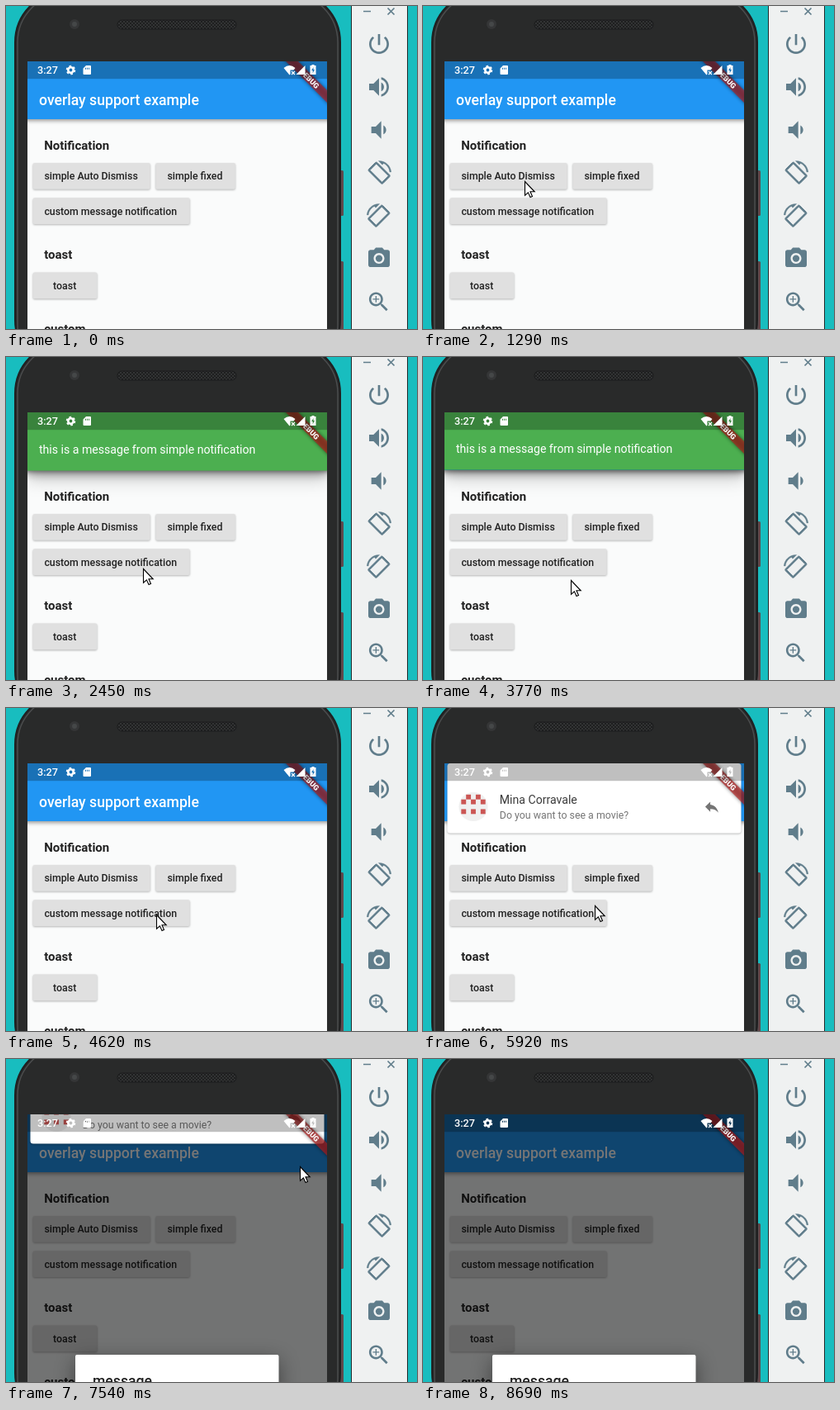
Write an HTML page that moves like this. It is 498 px wide and 391 px high and loops after 9.47 s.

```html
<!DOCTYPE html>
<html lang="en">
<head>
<meta charset="utf-8">
<title>Overlay notifications</title>
<style>
  html, body { margin: 0; width: 100%; height: 100%; overflow: hidden; background: #18bdbf; }
  svg { display: block; width: 498px; height: 391px; }
  text { font-family: Roboto, "Noto Sans", sans-serif; white-space: pre; }
  .title { font-size: 17.64px; font-weight: 500; }
  .head { font-size: 15px; font-weight: 700; fill: #212121; }
  .label { font-size: 12.35px; font-weight: 500; fill: #212121; }
  .btn { fill: #e0e0e0; filter: drop-shadow(0 1.5px 1.2px rgba(0,0,0,.28)); }
  .bar { fill: #2196f3; filter: drop-shadow(0 2px 2.5px rgba(0,0,0,.4)); }
  .high { filter: drop-shadow(0 6px 4px rgba(0,0,0,.22)) drop-shadow(0 8px 10px rgba(0,0,0,.24)); }
  .card { fill: #fff; filter: drop-shadow(0 1px 1px rgba(0,0,0,.26)); }
  .dialog { fill: #fff; filter: drop-shadow(0 7px 12px rgba(0,0,0,.45)); }
  .ink { fill: #c0c0c0; }
  .tool { fill: #607d8b; }
</style>
</head>
<body>
<svg viewBox="0 0 498 391">
  <defs>
    <clipPath id="screen"><rect x="26" y="67" width="363" height="324"/></clipPath>
    <clipPath id="autoBtn"><rect x="33" y="190.5" width="142" height="31.8" rx="2"/></clipPath>
    <clipPath id="customBtn"><rect x="33" y="232.8" width="190" height="31.8" rx="2"/></clipPath>
    <clipPath id="round"><circle cx="61" cy="119.5" r="17.6"/></clipPath>
    <pattern id="mesh" width="4" height="4" patternUnits="userSpaceOnUse">
      <rect width="4" height="4" fill="#1e1f1f"/>
      <circle cx="1" cy="1" r=".9" fill="#3c3d3e"/>
      <circle cx="3" cy="3" r=".9" fill="#3c3d3e"/>
    </pattern>
    <g id="rotate" stroke="#607d8b" stroke-width=".8">
      <path d="M10.23 1.75c-.59-.59-1.54-.59-2.12 0L1.75 8.11c-.59.59-.59 1.54 0 2.12l12.02 12.02c.59.59 1.54.59 2.12 0l6.36-6.36c.59-.59.59-1.54 0-2.12zm4.6 19.44L2.81 9.17l6.36-6.36 12.02 12.02z"/>
      <path stroke-width=".3" d="M16.48 2.52c3.27 1.55 5.61 4.72 5.97 8.48h1.5C23.44 4.84 18.29 0 12 0l-.66.03 3.81 3.81z"/>
    </g>
  </defs>

  <rect width="498" height="391" fill="#18bdbf"/>

  <!-- phone body -->
  <rect x="400" y="199" width="9" height="55" rx="1.5" fill="#5f494c"/>
  <rect x="400" y="309" width="9" height="100" rx="1.5" fill="#5f494c"/>
  <rect x="11" y="-18" width="394" height="460" rx="62" fill="#292a2a" stroke="#1f2021" stroke-width="2"/>
  <rect x="14" y="-15" width="388" height="460" rx="59" fill="#292a2a" stroke="#4b4d4e" stroke-width="1.5"/>
  <rect x="135" y="17" width="144" height="11" rx="5.5" fill="url(#mesh)" stroke="#1a1b1c"/>
  <circle cx="83" cy="22" r="6" fill="#353637"/>
  <circle cx="83" cy="22" r="3" fill="#454748"/>

  <!-- emulator toolbar -->
  <rect x="418.5" y="-2" width="68" height="396" fill="#eff1f1" stroke="#22292b"/>
  <path d="M433 6.5h9M462.5 2.5l8 8m0-8l-8 8" stroke="#607d8b" stroke-width="1.7" fill="none"/>
  <g class="tool">
    <path transform="translate(436 30) scale(1.333)" d="M13 3h-2v10h2V3zm4.83 2.17l-1.42 1.42C17.99 7.86 19 9.81 19 12c0 3.87-3.13 7-7 7s-7-3.13-7-7c0-2.19 1.01-4.14 2.58-5.42L6.17 5.17C4.23 6.82 3 9.26 3 12c0 4.97 4.03 9 9 9s9-4.03 9-9c0-2.74-1.23-5.18-3.17-6.83z"/>
    <path transform="translate(436 82) scale(1.333)" d="M3 9v6h4l5 5V4L7 9H3zm13.5 3c0-1.77-1.02-3.29-2.5-4.03v8.05c1.48-.73 2.5-2.25 2.5-4.02zM14 3.23v2.06c2.89.86 5 3.54 5 6.71s-2.11 5.85-5 6.71v2.06c4.01-.91 7-4.49 7-8.77s-2.99-7.86-7-8.77z"/>
    <path transform="translate(436 134) scale(1.333)" d="M18.5 12c0-1.77-1.02-3.29-2.5-4.03v8.05c1.48-.73 2.5-2.25 2.5-4.02zM5 9v6h4l5 5V4L9 9H5z"/>
    <use href="#rotate" transform="translate(437.5 187.5) scale(1.22)"/>
    <use href="#rotate" transform="translate(466.5 239.5) scale(-1.22 1.22)"/>
    <g transform="translate(436.4 290) scale(1.3)">
      <circle cx="12" cy="12" r="3.2"/>
      <path d="M9 2L7.17 4H4c-1.1 0-2 .9-2 2v12c0 1.1.9 2 2 2h16c1.1 0 2-.9 2-2V6c0-1.1-.9-2-2-2h-3.17L15 2H9zm3 15c-2.76 0-5-2.24-5-5s2.24-5 5-5 5 2.24 5 5-2.24 5-5 5z"/>
    </g>
    <path transform="translate(436 342.6) scale(1.3)" d="M15.5 14h-.79l-.28-.27C15.41 12.59 16 11.11 16 9.5 16 5.91 13.09 3 9.5 3S3 5.91 3 9.5 5.91 16 9.5 16c1.61 0 3.09-.59 4.23-1.57l.27.28v.79l5 4.99L20.49 19zm-6 0C7.01 14 5 11.99 5 9.5S7.01 5 9.5 5 14 7.01 14 9.5 11.99 14 9.5 14zM12.5 10H10v2.5H9V10H6.5V9H9V6.5h1V9h2.5z"/>
  </g>

  <g clip-path="url(#screen)">
    <!-- page -->
    <rect x="26" y="67" width="363" height="324" fill="#fafbfb"/>
    <rect class="bar" x="20" y="60" width="375" height="77"/>
    <text class="title" x="40" y="119.7" fill="#fff">overlay support example</text>
    <g transform="translate(-.3 -.5)">
      <text class="head" x="46.5" y="174.5">Notification</text>
      <rect class="btn" x="33" y="190.5" width="142" height="31.8" rx="2"/>
      <rect class="btn" x="181.7" y="190.5" width="96.5" height="31.8" rx="2"/>
      <rect class="btn" x="33" y="232.8" width="190" height="31.8" rx="2"/>
      <rect class="btn" x="33" y="323" width="77.7" height="31.8" rx="2"/>
      <g clip-path="url(#autoBtn)"><circle class="ink" id="inkAuto" cx="112" cy="202"/></g>
      <g clip-path="url(#customBtn)"><circle class="ink" id="inkCustom" cx="182" cy="250"/></g>
      <text class="label" x="46.7" y="210.7">simple Auto Dismiss</text>
      <text class="label" x="195.8" y="210.7">simple fixed</text>
      <text class="label" x="46.7" y="253">custom message notification</text>
      <text class="head" x="46.5" y="306.5">toast</text>
      <text class="label" x="71.5" y="343.2" text-anchor="middle">toast</text>
      <text class="head" x="46.5" y="396">custom</text>
    </g>

    <!-- dialog -->
    <g id="modal">
      <rect x="26" y="67" width="363" height="324" fill="#000" opacity=".54"/>
      <rect class="dialog" x="84" y="358" width="246.5" height="90" rx="2"/>
      <text class="title" x="105" y="396.2" fill="#212121">message</text>
    </g>

    <!-- notifications -->
    <g id="simple">
      <rect class="high" x="26" y="40" width="363" height="97.6" fill="#4caf50"/>
      <text x="40" y="117.2" font-size="14.1" fill="#fff">this is a message from simple notification</text>
    </g>
    <g id="message">
      <rect class="card" x="29.5" y="67" width="356" height="84.5" rx="3.5"/>
      <circle cx="61" cy="119.5" r="17.6" fill="#f0f0f0"/>
      <g id="avatar" fill="#cb5654" clip-path="url(#round)"></g>
      <text x="92.8" y="116" font-size="14.1" fill="#3c3c3c">Mina Corravale</text>
      <text x="92.8" y="133.5" font-size="12.35" fill="#757575">Do you want to see a movie?</text>
      <circle id="inkReply" cy="119.5" fill="#b0b0b0"/>
      <path transform="translate(339.3 109) scale(.882)" fill="#757575" d="M10 9V5l-7 7 7 7v-4.1c5 0 8.5 1.6 11 5.1-1-5-4-10-11-11z"/>
    </g>

    <!-- debug ribbon -->
    <g transform="translate(389 67) rotate(45)">
      <rect x="-40" y="24.7" width="80" height="10.6" opacity=".5" style="filter:blur(2.2px)"/>
      <rect x="-36" y="24.7" width="72" height="10.6" fill="#b71c1c" opacity=".63"/>
      <text y="33.2" text-anchor="middle" font-size="9" font-weight="900" fill="#fff">DEBUG</text>
    </g>

    <!-- status bar -->
    <rect x="26" y="67" width="363" height="21.2" fill="#000" opacity=".25"/>
    <g fill="#fff">
      <text x="38" y="82.2" font-size="12.7" font-weight="500">3:27</text>
      <circle cx="78.5" cy="77.5" r="3.2" fill="none" stroke="#fff" stroke-width="2.6"/>
      <circle cx="78.5" cy="77.5" r="4.9" fill="none" stroke="#fff" stroke-width="1.8" stroke-dasharray="2.6 2.53"/>
      <path fill-rule="evenodd" d="M97 72h5q1 0 1 1v9q0 1-1 1h-7.5q-1 0-1-1v-6.5zM96 74.8v2h1v-2zm2 0v2h1v-2zm2 0v2h1v-2z"/>
      <path d="M336.5 75q7-6 14 0l-2 2.5h-4v5l-1 1z"/>
      <path d="M346 79l4 4m0-4l-4 4" stroke="#fff" stroke-width="1.2"/>
      <path d="M351.5 83h11V72z"/>
      <path fill-rule="evenodd" d="M370.5 72v-1h3v1h2v11h-7V72zm2 2l-2.300 4h1.500v3.300l2.300-4.300h-1.500z"/>
    </g>
  </g>

  <path id="cursor" d="M.5 .5V17.2L4.4 13.8 7 19.500 9.500 18.500 7 12.800H12.200Z" fill="#fff" stroke="#000" stroke-width="1.1"/>
</svg>

<script>
  const LOOP = 9470, STEP = 77, PHASE = 27;
  const $ = id => document.getElementById(id);

  // Linear interpolation through rows of [time, ...values].
  function track(rows, t) {
    if (t <= rows[0][0]) return rows[0].slice(1);
    for (let i = 1; i < rows.length; i++) {
      const a = rows[i - 1], b = rows[i];
      if (t < b[0]) {
        const p = (t - a[0]) / (b[0] - a[0]);
        return a.slice(1).map((v, j) => v + (b[j + 1] - v) * p);
      }
    }
    return rows[rows.length - 1].slice(1);
  }

  const pointer = [
    [204, 318, 351], [435, 217, 306],
    [589, 217, 306], [1359, 112, 202],
    [2129, 112, 202], [2514, 179, 270],
    [4400, 179, 270], [4593, 182, 250],
    [5598, 182, 250], [5906, 208, 239],
    [6060, 208, 239], [6676, 356, 130],
    [7550, 356, 130], [8289, 243, 373],
    [8366, 252, 378], [8520, 252, 378], [8597, 317, 385]
  ];
  const simpleShift = [[1825, -70.6], [2125, 0], [3741, 0], [4100, -70.6]];
  const cardShift = [[5365, -84.5], [5665, 0], [7345, 0], [7645, -84.5]];
  const modalFade = [[7355, 0], [7505, 1]];
  const splash = [[0, 0, .4], [77, 15, .4], [160, 15, .4], [240, 60, .4], [460, 120, 0]];
  const replySplash = [
    [6906, 358, 0, .4], [7045, 357, 20, .4], [7130, 357, 20, .4],
    [7200, 350, 31, .4], [7345, 350, 31, .4], [7520, 350, 31, 0]
  ];

  const CELL = 5.88;
  [".#.#.", "#.#.#", ".....", "#.#.#", "....."].forEach((row, y) =>
    [...row].forEach((c, x) => {
      if (c !== "#") return;
      const cell = document.createElementNS("http://www.w3.org/2000/svg", "rect");
      const box = { x: 46.3 + x * CELL, y: 104.8 + y * CELL, width: CELL, height: CELL };
      for (const k in box) cell.setAttribute(k, box[k]);
      $("avatar").append(cell);
    }));

  function show(el, on) { el.style.visibility = on ? "visible" : "hidden"; }

  function slide(id, rows, hidden, t) {
    const [y] = track(rows, t);
    show($(id), y > hidden);
    $(id).setAttribute("transform", `translate(0 ${y})`);
  }

  function ink(id, r, alpha) {
    $(id).setAttribute("r", r);
    $(id).setAttribute("opacity", alpha);
  }

  function draw(now) {
    const t = Math.floor((now % LOOP + PHASE) / STEP) * STEP - PHASE;
    const [x, y] = track(pointer, t);
    $("cursor").setAttribute("transform", `translate(${Math.round(x)} ${Math.round(y)})`);
    show($("cursor"), t >= 200 && t < 8660);

    slide("simple", simpleShift, -70.6, t);
    slide("message", cardShift, -84.5, t);
    $("modal").setAttribute("opacity", track(modalFade, t)[0]);

    ink("inkAuto", ...track(splash, t - 1436));
    ink("inkCustom", ...track(splash, t - 4978));
    const [cx, r, alpha] = track(replySplash, t);
    $("inkReply").setAttribute("cx", cx);
    ink("inkReply", r, alpha);
  }

  const start = performance.now();
  function tick() {
    draw(performance.now() - start);
    requestAnimationFrame(tick);
  }
  tick();
</script>
</body>
</html>
```
